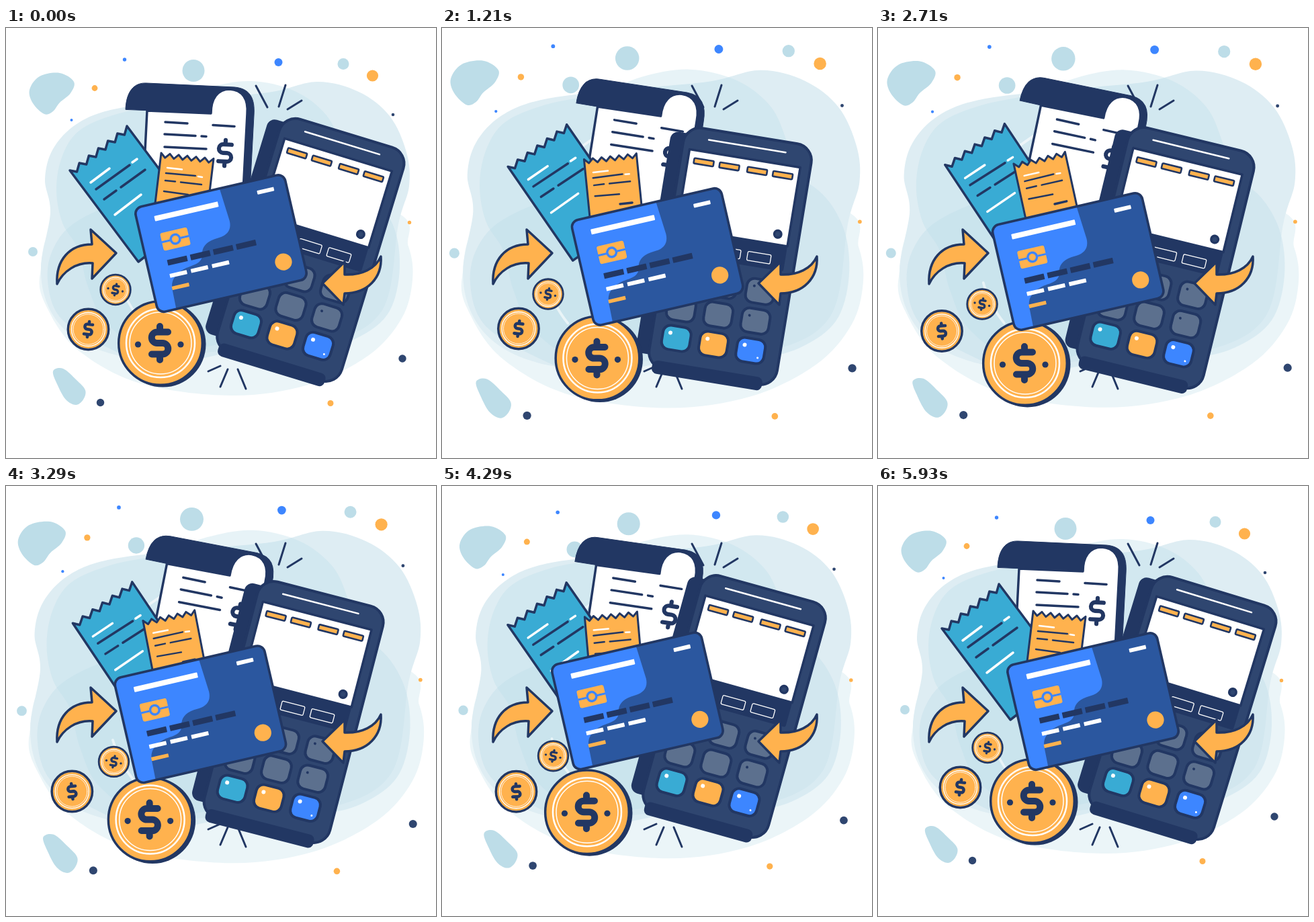
Recreate the animation shown at these times as an HTML page with a canvas. Size 640 by 640 pixels, loop 6 s.

```html
<!DOCTYPE html>
<html lang="en">
<head>
<meta charset="utf-8">
<title>Payment illustration</title>
<style>
html, body { margin: 0; width: 100%; height: 100%; overflow: hidden; background: #fff; }
canvas { display: block; width: 640px; height: 640px; }
</style>
</head>
<body>
<canvas id="stage"></canvas>
<script>
const canvas = document.getElementById('stage');
const ctx = canvas.getContext('2d');
const dpr = window.devicePixelRatio || 1;
canvas.width = canvas.height = 640 * dpr;

const NAVY = '#223763', BODY = '#2f4670', ORANGE = '#ffb24e', BLUE = '#3d86ff',
  DEEP = '#2b579f', TEAL = '#39abd4', PALE = '#bddde8', GREY = '#5c708e', WHITE = '#fff';
const LOOP = 6000, FPS = 14, END = 83000 / FPS, RAD = Math.PI / 180;
const TIMES = [0, 1210, 1860, 2710, 3790, 4860];

// Cyclic cubic through timed values; "rest" stops at every turning point.
function track(vals, { rest = false, turn = 0, times = TIMES } = {}) {
  const n = vals.length;
  const T = i => times[(i + n) % n] + END * Math.floor(i / n);
  const V = i => vals[(i + n) % n] + turn * Math.floor(i / n);
  const slope = i => (V(i + 1) - V(i)) / (T(i + 1) - T(i));
  const tangent = i => {
    const a = slope(i - 1), b = slope(i), h = T(i) - T(i - 1), k = T(i + 1) - T(i);
    return rest && a * b <= 0 ? 0 : (a * k + b * h) / (h + k);
  };
  return t => {
    let i = n - 1;
    while (i > 0 && t < times[i]) i--;
    const h = T(i + 1) - T(i), u = (t - T(i)) / h, w = 1 - u;
    return w * w * (1 + 2 * u) * V(i) + u * u * (3 - 2 * u) * V(i + 1)
      + u * w * h * (w * tangent(i) - u * tangent(i + 1));
  };
}
const eased = vals => track(vals, { rest: true });
const path = (xs, ys) => {
  const x = track(xs), y = track(ys);
  return t => [x(t), y(t)];
};

const zoom = track([1, 1.03, 1.0765, 1.0865, 1.0735, 1.044, 1.015],
  { rest: true, times: [0, 640, 1210, 1860, 2710, 3790, 4860] });
const rollTilt = eased([0, 6, 8.5, 9, 6.9, 3.6]);
const tealTilt = eased([0, 2.2, 3.1, 3.3, 2.6, 1.3]);
const slipTilt = eased([0, -12.5, -17.7, -19.2, -15.2, -7.5]);
const posTilt = eased([17, 9.3, 10.5, 13.7, 14.9, 16.2]);
const posAt = path([411, 404, 399, 393, 392, 402], [457, 471, 473, 471, 459, 454]);
const cardTurn = track([-35, 31, 67, 114, 185, 256], { turn: 360 });
const bigAt = path([230, 231.5, 226, 219, 213, 221.5], [469, 491.5, 499.5, 499, 492.5, 476.5]);
const midAt = path([122.5, 114, 106, 95, 104.5, 117], [448.5, 447.5, 447.5, 451, 456.5, 451.5]);
const midTilt = eased([8, 7, 5, -4, -6, 3]);
const smallAt = path([163, 158, 154, 155, 165, 164.5], [389.5, 396, 402, 411, 407, 395.5]);

function paint(fill, stroke, width = 3.5) {
  if (fill) { ctx.fillStyle = fill; ctx.fill(); }
  if (stroke) { ctx.strokeStyle = stroke; ctx.lineWidth = width; ctx.stroke(); }
}
function disc(x, y, r, fill, stroke, width) {
  ctx.beginPath();
  ctx.arc(x, y, r, 0, 7);
  paint(fill, stroke, width);
}
function line(x1, y1, x2, y2, color = NAVY, width = 3.5) {
  ctx.beginPath();
  ctx.moveTo(x1, y1);
  ctx.lineTo(x2, y2);
  paint(null, color, width);
}
function box(x, y, w, h, r, fill, stroke, width) {
  ctx.beginPath();
  ctx.roundRect(x, y, w, h, r);
  paint(fill, stroke, width);
}
const bar = (cx, cy, w, h, r, ...style) => box(cx - w / 2, cy - h / 2, w, h, r, ...style);
function shape(d, fill, stroke, width = 3.5) {
  const p = new Path2D(d);
  if (fill) { ctx.fillStyle = fill; ctx.fill(p); }
  if (stroke) { ctx.strokeStyle = stroke; ctx.lineWidth = width; ctx.stroke(p); }
}
function blob(pts, fill) {
  const n = pts.length, at = i => pts[(i + n) % n];
  ctx.beginPath();
  ctx.moveTo(...pts[0]);
  for (let i = 0; i < n; i++) {
    const [a, b, c, d] = [at(i - 1), at(i), at(i + 1), at(i + 2)];
    ctx.bezierCurveTo(b[0] + (c[0] - a[0]) / 6, b[1] + (c[1] - a[1]) / 6,
      c[0] - (d[0] - b[0]) / 6, c[1] - (d[1] - b[1]) / 6, c[0], c[1]);
  }
  paint(fill);
}
function placed(x, y, deg, draw) {
  ctx.save();
  ctx.translate(x, y);
  ctx.rotate(deg * RAD);
  draw();
  ctx.restore();
}
const swing = (x, y, deg, draw) => placed(x, y, deg, () => {
  ctx.translate(-x, -y);
  draw();
});
function dollar(x, y, size, deg = 0, width = 10) {
  placed(x, y, deg, () => {
    ctx.scale(size, size);
    shape('M12-16.5H-4A8.25 8.25 0 0 0-4 0H4A8.25 8.25 0 0 1 4 16.5H-12M0-17V-25M0 17V25',
      null, NAVY, width);
  });
}

function backdrop(s) {
  ctx.save();
  ctx.translate(322, 305);
  ctx.scale(s, s);
  ctx.translate(-322, -305);
  blob([[51, 365], [63, 420], [108, 480], [200, 529], [335, 547], [450, 531], [540, 487],
    [589, 432], [605, 375], [599, 325], [570, 270], [300, 220], [90, 280]], '#ebf5f8');
  blob([[58, 225], [70, 180], [105, 143], [160, 121], [260, 108], [390, 96], [463, 80], [525, 95],
    [571, 131], [596, 185], [600, 235], [584, 292], [560, 420], [470, 470], [330, 480],
    [209, 491], [144, 481], [93, 454], [62, 412], [52, 355], [66, 275]], '#deedf3');
  blob([[75, 240], [84, 190], [110, 152], [165, 128], [240, 112], [300, 89], [365, 79], [430, 94],
    [477, 130], [500, 180], [520, 250], [480, 380], [350, 460], [220, 480], [150, 440],
    [122, 385], [108, 330], [84, 290]], 'rgba(189,221,232,.36)');
  blob([[535, 240], [575, 291], [586, 356], [571, 421], [529, 458], [470, 476], [380, 470],
    [300, 490], [220, 500], [140, 470], [80, 430], [62, 375], [72, 325], [110, 285],
    [200, 250], [350, 220], [460, 215]], 'rgba(189,221,232,.4)');
  shape('M168 374Q176 404 197 430M214 187L237 171', null, 'rgba(255,255,255,.6)', 3.5);
  blob([[35, 92], [50, 72], [80, 67], [101, 80], [96, 97], [80, 111], [70, 124], [57, 128],
    [40, 112]], PALE);
  blob([[70, 511], [85, 507], [105, 524], [118, 539], [115, 553], [104, 561], [89, 553],
    [77, 532]], PALE);
  [[279, 63.5, 16.5, PALE], [502, 53.5, 8.5, PALE], [40, 333, 7, PALE], [201, 100.5, 11.5, PALE],
    [176.5, 47, 2.7, BLUE], [405.5, 51, 6, BLUE], [97.5, 137, 2, BLUE],
    [132, 89.5, 4.4, ORANGE], [545.5, 71, 8.6, ORANGE], [600.5, 289.5, 2.7, ORANGE],
    [483, 558.5, 4.5, ORANGE], [576, 129, 2.3, BODY], [590, 492, 5.7, BODY],
    [140.5, 557.5, 5.7, BODY]].forEach(d => disc(...d));
  ctx.restore();
}

function sparks() {
  shape('M372 86L389 118M416 85L406 117M440 108L419 121M301 511L319 503M330 508L319 534M345 508L357 537',
    null, NAVY, 3);
}

function roll() {
  shape('M178 121C179 95 190 81 209 82L340 88C362 90 371 103 369 130L360 300H202L210 123Z', NAVY, NAVY, 1);
  shape('M210 123L305 127C305 105 315 91 333 91C352 92 361 106 359 128L350 300H201Z', WHITE, NAVY);
  line(237, 140, 270, 142);
  line(308, 144.5, 340, 146.5);
  line(236, 158, 282, 160.5);
  line(291, 161, 298, 161.5);
  line(236, 177, 298, 180);
  dollar(326, 186, .77, 3, 8);
}

// Paper with a torn top: tooth step (sx, sy), notch (nx, ny) after each tip.
function torn(x, y, sx, sy, nx, ny, corners, fill, width) {
  ctx.beginPath();
  ctx.moveTo(x, y);
  for (let i = 0; i < 6; i++) {
    ctx.lineTo(x + i * sx + nx, y + i * sy + ny);
    ctx.lineTo(x + (i + 1) * sx, y + (i + 1) * sy);
  }
  corners.forEach(p => ctx.lineTo(...p));
  ctx.closePath();
  paint(fill, NAVY, width);
}
function tealSlip() {
  torn(95, 212, 14.17, -11, 10.5, 2, [[282, 282], [197, 348]], TEAL, 3.5);
  line(126, 230, 154, 209, WHITE);
  line(134, 240, 184, 204);
  line(188, 200, 195, 195, WHITE);
  line(146, 255, 164, 242);
  line(171, 237, 207, 211);
  line(162, 278, 201, 248, WHITE);
}
function orangeSlip() {
  torn(231, 186, 13, 1.4, 5.8, 7.2, [[297, 294], [219, 286]], ORANGE, 3);
  line(240, 208, 262, 210.5, WHITE, 2.5);
  line(238, 216, 282, 220, NAVY, 2.5);
  line(286, 221, 292, 222, WHITE, 2.5);
  line(237, 227, 252, 228.5, NAVY, 2.5);
  line(260, 229.5, 291, 233, NAVY, 2.5);
  line(235, 243, 271, 248, NAVY, 2.5);
  line(269, 262.6, 287, 264.6, NAVY, 3.5);
}

function terminal() {
  box(-113, -304, 50, 334, 12, NAVY);
  box(-93, -315, 193, 363, 25, BODY, NAVY, 4);
  line(-56, -299.5, 60, -299.5, WHITE, 2.5);
  box(-82, -162, 167, 38, 3, NAVY);
  box(-82, -281, 167, 119, 0, WHITE, NAVY, 3.5);
  [-58, -19.5, 22.5, 61].forEach(u => bar(u, -265.3, 29.5, 8, 1.5, ORANGE, NAVY, 2.6));
  disc(68, -177.6, 7, NAVY);
  disc(68, -177.6, 3.5, BODY);
  [.5, 46].forEach(u => bar(u, -138.5, 35, 13.5, 2, null, WHITE, 1.3));
  const bottom = [TEAL, ORANGE, BLUE];
  for (let row = 0; row < 3; row++) {
    for (let col = 0; col < 3; col++) {
      const u = col * 56 - 56, v = -44.5 * row;
      bar(u, v, 42, 36, 11, row ? GREY : bottom[col], NAVY, 4);
      if (!row) disc(u - 10, v - 7, 3, WHITE);
      else if (col === 2) disc(u - 10, v - 7, 2, NAVY);
    }
  }
  disc(68, 9, 1.5, WHITE);
  box(-85, 37, 166, 20, 8, NAVY);
}

function coin(x, y, r, stroke, rings) {
  disc(x, y, r, ORANGE, NAVY, stroke);
  rings.forEach(([radius, w]) => disc(x, y, radius, null, WHITE, w));
}
function coins(t) {
  const [bx, by] = bigAt(t), [mx, my] = midAt(t), [sx, sy] = smallAt(t);
  disc(bx + 3.5, by + 1.5, 64, NAVY);
  coin(bx, by, 62.3, 3.5, [[51, 2.5], [46, 1.5]]);
  dollar(bx - 1, by, 1);
  disc(bx - 33.5, by + 2, 4.6, NAVY);
  disc(bx + 30, by + 2, 4.6, NAVY);
  coin(mx, my, 30.2, 3.5, [[25, 1.3], [22.5, .8]]);
  dollar(mx, my, .46, midTilt(t));
  coin(sx, sy, 22.3, 2.8, [[18.3, 1.2], [16.3, .7]]);
  dollar(sx, sy, .34, 11);
  disc(sx - 11, sy - 2, 1.7, NAVY);
  disc(sx + 10.5, sy + 2.5, 1.7, NAVY);
}

function card() {
  ctx.save();
  ctx.beginPath();
  ctx.roundRect(-114.2, -80.2, 228.5, 160.5, 11);
  ctx.clip();
  paint(DEEP);
  shape('M16-82L20-30C20-16 12-10 0-9L-8-8.5C-24-7-30 2-31 10C-33 20-42 22-52 23'
    + 'C-72 25-85 34-86 50L-87 82H-120V-82Z', BLUE);
  ctx.restore();
  bar(0, 0, 228.5, 160.5, 11, null, NAVY, 3.6);
  box(-88, -62, 97, 8, 1, WHITE);
  box(69.5, -64.5, 25.5, 6, 1, WHITE);
  bar(-64.8, -21.6, 41, 27, 3, ORANGE);
  ctx.lineCap = 'butt';
  line(-86, -21.6, -44, -21.6, BLUE, 3);
  ctx.lineCap = 'round';
  disc(-64.8, -21.6, 6.8, ORANGE, BLUE, 3.5);
  for (let i = 0; i < 4; i++) box(-84 + i * 35, 6, 30, 8.5, .5, NAVY);
  for (let i = 0; i < 3; i++) box(-85 + i * 32.2, 27, 26, 6, .5, WHITE);
  box(-86, 46, 26, 5.5, .5, ORANGE);
  disc(84.4, 47.7, 12.6, ORANGE);
}

function arrows() {
  shape('M76 381C74 345 95 322 128 322L126 300L164 335L128 373L129 350C105 348 85 362 76 381Z', ORANGE, NAVY);
  shape('M471 380L504 348V367C530 368 550 358 558 340C560 372 538 395 504 395L502 412Z', ORANGE, NAVY);
}

function render(now) {
  const step = Math.floor(((now % LOOP) + 5) * FPS / 1000);
  const t = Math.min(step, 83) * 1000 / FPS;
  ctx.setTransform(dpr, 0, 0, dpr, 0, 0);
  ctx.fillStyle = WHITE;
  ctx.fillRect(0, 0, 640, 640);
  ctx.lineCap = ctx.lineJoin = 'round';

  backdrop(zoom(t));
  sparks();
  swing(276.6, 325, rollTilt(t), roll);
  swing(243, 290, tealTilt(t), tealSlip);
  swing(264, 280, slipTilt(t), orangeSlip);
  placed(...posAt(t), posTilt(t), terminal);
  coins(t);
  const a = cardTurn(t) * RAD;
  placed(305.2 + 18.1 * Math.cos(a), 331 + 18.1 * Math.sin(a), -13, card);
  arrows();
}

const start = performance.now();
function tick() {
  render(performance.now() - start);
  requestAnimationFrame(tick);
}
tick();
</script>
</body>
</html>
```
